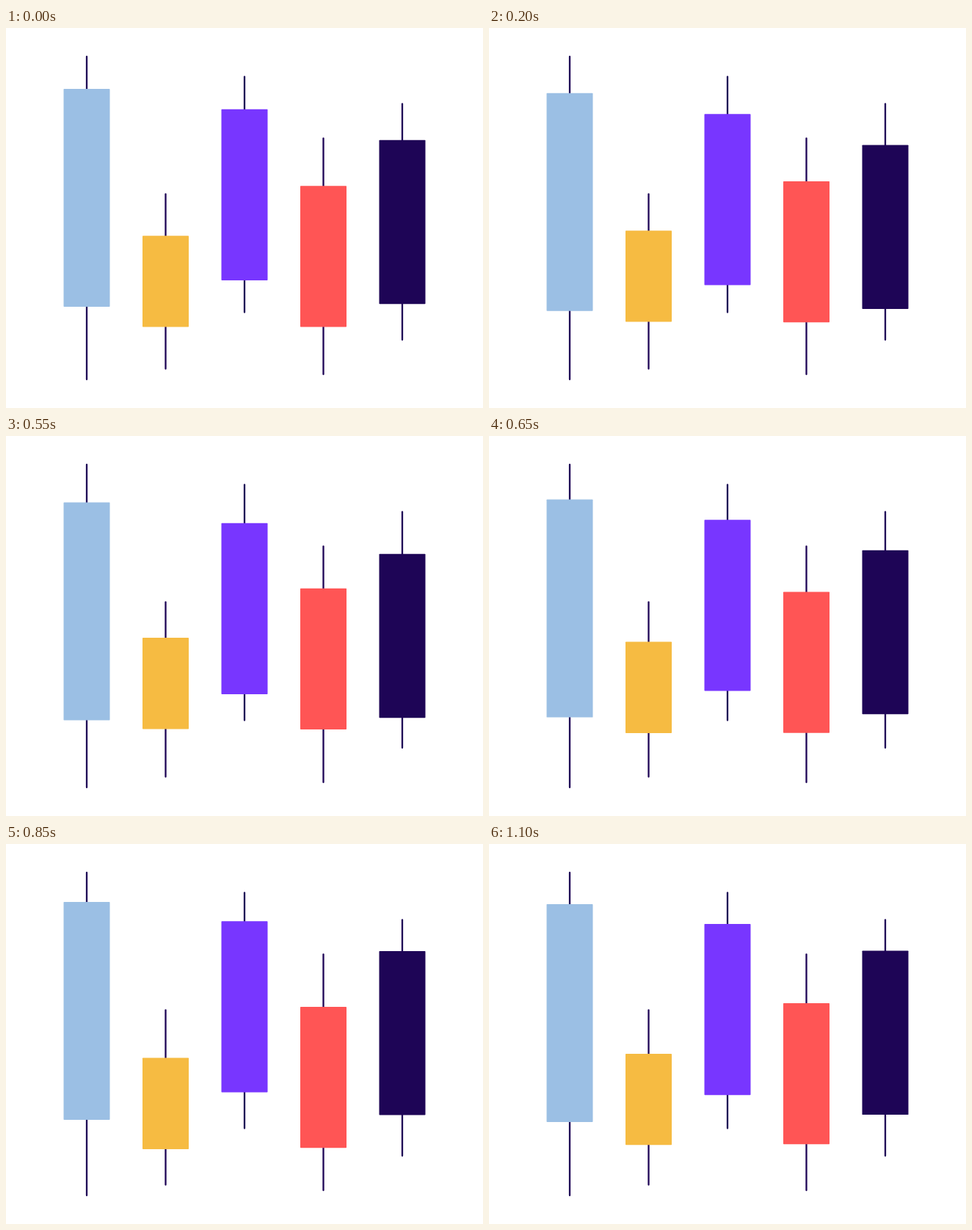
Write an HTML page that moves like this. It is 650 px wide and 518 px high and loops after 1.15 s.

```html
<!DOCTYPE html>
<html lang="en">
<head>
<meta charset="utf-8">
<title>Candlestick chart</title>
<style>
  html, body { margin: 0; width: 100%; height: 100%; overflow: hidden; background: #fff; }
  svg { display: block; width: 100%; height: 100%; }
</style>
</head>
<body>
<svg id="chart" viewBox="0 0 650 518"></svg>
<script>
const LOOP = 1150, STEP = 50, BAR_WIDTH = 63, INK = '#1e0556';
const KEY_TIMES = [0, 425, 875, LOOP];

// tops: upper edge of the body at each key time
const candles = [
  { x: 110,   color: '#9bbfe4', height: 297,   wick: [39, 479],      tops: [83, 95.2, 78, 82.8] },
  { x: 217.5, color: '#f6bb42', height: 124.3, wick: [226.5, 464.5], tops: [283.2, 268.2, 293, 284.4] },
  { x: 325,   color: '#7836ff', height: 233.2, wick: [66.5, 387.5],  tops: [110.8, 124.5, 104.2, 110.1] },
  { x: 432.5, color: '#ff5555', height: 192.3, wick: [150.5, 472],   tops: [215.2, 201.8, 223.2, 215.6] },
  { x: 540,   color: INK,       height: 223.5, wick: [103.5, 425],   tops: [152.8, 166.9, 144.7, 145.8] }
];

const chart = document.getElementById('chart');

function add(tag, attributes) {
  const node = document.createElementNS('http://www.w3.org/2000/svg', tag);
  for (const name in attributes) node.setAttribute(name, attributes[name]);
  return chart.appendChild(node);
}

for (const candle of candles) {
  const { x, color, height, wick } = candle;
  add('line', {
    x1: x, x2: x, y1: wick[0], y2: wick[1],
    stroke: INK, 'stroke-width': 2.3, 'stroke-linecap': 'round'
  });
  candle.body = add('rect', { x: x - BAR_WIDTH / 2, width: BAR_WIDTH, height, rx: 0.7, fill: color });
}

function topAt(tops, time) {
  const i = KEY_TIMES.findIndex(key => key > time);
  const progress = (time - KEY_TIMES[i - 1]) / (KEY_TIMES[i] - KEY_TIMES[i - 1]);
  return tops[i - 1] + (tops[i] - tops[i - 1]) * progress;
}

function draw(now) {
  const time = Math.floor((now % LOOP) / STEP) * STEP;
  for (const { body, tops } of candles) body.setAttribute('y', topAt(tops, time).toFixed(2));
}

function tick(now) {
  draw(now);
  requestAnimationFrame(tick);
}

draw(0);
requestAnimationFrame(tick);
</script>
</body>
</html>
```
